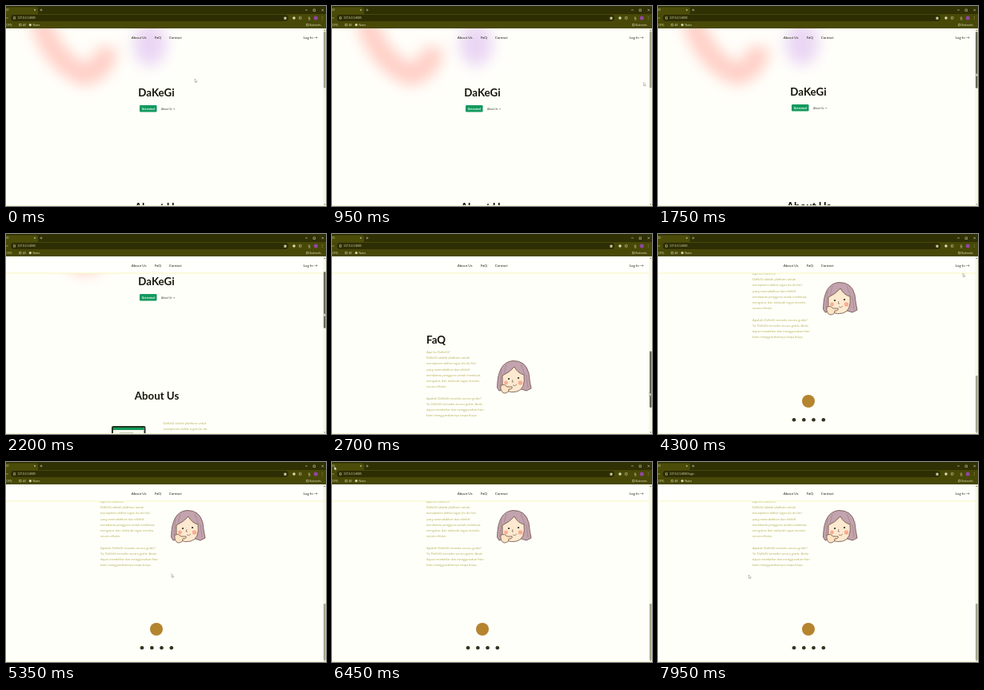
An HTML page for the animation above (8 s loop, 400 by 250 pixels).

```html
<!DOCTYPE html>
<html lang="id">
<head>
<meta charset="utf-8">
<title>DaKeGi</title>
<style>
html, body { margin: 0; height: 100%; overflow: hidden; background: #fffffa; }
svg { display: block; width: 100vw; height: 100vh; font-family: Lato, sans-serif; }
.nav { font-size: 4.6px; fill: #26260f; }
.title { font-size: 13.3px; font-weight: 700; fill: #15150a; text-anchor: middle; }
.copy { font-size: 4.1px; fill: #b9b563; }
.ui { font-size: 3.3px; fill: #d8d8ae; }
.line { fill: none; stroke: #d0d0a4; stroke-width: .6; }
</style>
</head>
<body>
<svg viewBox="0 0 400 250">
  <defs>
    <filter id="blur" x="-50%" y="-50%" width="200%" height="200%"><feGaussianBlur stdDeviation="9"/></filter>
    <clipPath id="view"><rect y="28" width="400" height="222"/></clipPath>
  </defs>
  <rect width="400" height="250" fill="#fffffa"/>

  <g clip-path="url(#view)">
    <g id="page">
      <g filter="url(#blur)">
        <path d="M42 16Q58 70 98 86Q124 80 126 52" fill="none" stroke="#ffab9f" stroke-width="27" opacity=".58"/>
        <ellipse cx="180" cy="48" rx="21" ry="27" fill="#d9b5f0" opacity=".55"/>
      </g>
      <text class="title" x="188" y="113">DaKeGi</text>
      <rect x="167" y="124" width="21.5" height="8.6" rx="1.3" fill="#129a5e"/>
      <text x="177.7" y="129.5" font-size="3.2" font-weight="700" fill="#fff" text-anchor="middle">Get started</text>
      <text x="194" y="129.5" font-size="3.2" fill="#43432a">About Us →</text>

      <text class="title" x="188.5" y="255.5">About Us</text>
      <g id="tablet">
        <rect x="132" y="289" width="42.5" height="34" rx="2" fill="#24351f"/>
        <rect x="134" y="291" width="38.5" height="29" fill="#f9fbef"/>
        <rect x="134" y="291" width="38.5" height="3" fill="#129a5e"/>
        <path d="M142 298h17M142 304h24M142 310h20" stroke="#7f9b75"/>
      </g>
      <g id="about" class="copy"></g>

      <text class="title" x="118" y="504.5" style="text-anchor:start">FaQ</text>
      <g id="faq" class="copy"></g>
      <g transform="translate(0 466)" stroke="#6a5040" stroke-width=".8" stroke-linejoin="round">
        <path d="M209 98L206.500 94Q207 62 226 60.500Q242 60 246 76Q247 86 249 95L243 98L237 96L214 97Z" fill="#c2a3ae"/>
        <path d="M213 79Q222 75 228 68Q232 76 240 78Q242 96 231 99Q217 102 213 91Z" fill="#fde9cf"/>
        <path d="M211 91Q216 89 219 93L225 93Q226 96 221 96Q221 101 215 101Q210 99 211 91Z" fill="#fde4c4"/>
        <path d="M212 70L210 92M218 65L215 76M236 65L241 78M243 78L245 94" fill="none" stroke="#94747f" stroke-width=".5"/>
        <path d="M226 84L225 87L227 87M226 91Q229 93 231 90" fill="none" stroke-width=".6"/>
        <g stroke="none">
          <circle cx="221" cy="83" r="1.100" fill="#33241c"/><circle cx="233" cy="82" r="1.100" fill="#33241c"/>
          <circle cx="217.500" cy="88" r="2.400" fill="#f6ad91"/><circle cx="235.500" cy="88" r="2.700" fill="#f6ad91"/>
        </g>
      </g>

      <circle cx="188" cy="675" r="8" fill="#b5842f"/>
      <g fill="#33331c">
        <circle cx="170" cy="698.300" r="2.300"/><circle cx="182.300" cy="698.300" r="2.300"/>
        <circle cx="194.500" cy="698.300" r="2.300"/><circle cx="206.800" cy="698.300" r="2.300"/>
      </g>
    </g>

    <g id="bar">
      <rect y="28" width="397" height="21" fill="#fffffc"/>
      <rect y="48.500" width="397" height="1" fill="#f8f6be"/>
    </g>
    <g class="nav">
      <text x="156.700" y="40.500">About Us</text>
      <text x="185.800" y="40.500">FaQ</text>
      <text x="203.700" y="40.500">Contact</text>
      <text x="371.700" y="40.500">Log In →</text>
    </g>
    <rect y="249" width="400" height="1" fill="#f5f4cf"/>
    <rect x="396.500" y="28" width="3.500" height="222" fill="#f6f6e2"/>
    <path d="M397.200 31L398.300 29.500L399.400 31ZM397.200 247.500L398.300 249L399.400 247.500Z" fill="#77775a"/>
    <rect id="thumb" x="397" y="32" width="2.600" height="70.500" rx="1"/>
  </g>

  <g>
    <rect width="400" height="28" fill="#484907"/>
    <rect width="400" height="10" fill="#2f3003"/>
    <path d="M0 1.500H38Q40 1.500 40 4V10H0Z" fill="#4b4c08"/>
    <rect x="6" y="11" width="347" height="8" rx="4" fill="#2d2e04"/>
    <g class="ui">
      <text x="0" y="6.300">GI</text>
      <text id="url" x="14.500" y="16.300"></text>
      <text x="0" y="24.800">(195)</text>
      <text x="21" y="24.800">All</text>
      <text x="33.500" y="24.800">Notes</text>
      <text x="379.500" y="24.800" font-size="2.900">Bookmarks</text>
    </g>
    <path class="line" d="M35 4l2 2m0-2l-2 2M42.500 5h3m-1.500-1.500v3M374 5h3M384 4h2.500v2.500h-2.500ZM394.500 3.800l2.500 2.500m0-2.500l-2.500 2.500M0 15h2.500M9.500 13.700h2v2.500h-2ZM16.500 22.500h2.500v2.200h-2.500ZM375.500 22.500h2.500v2.200h-2.500ZM366.500 13.700h2.500v2.500h-2.500ZM379 13v3m-1.300-1.200l1.300 1.300l1.300-1.300M378 17h2.600M395.300 13v.6m0 1v.6m0 1v.6"/>
    <path d="M349 12.700l.7 1.600l1.700.2l-1.300 1.100l.4 1.700l-1.500-.9l-1.500.9l.4-1.700l-1.300-1.100l1.700-.2Z" fill="#d8d8ae"/>
    <circle cx="360" cy="15" r="1.700" fill="#dedeb8"/>
    <circle cx="387.300" cy="15" r="2.500" fill="#9147a4"/>
    <circle cx="30.300" cy="23.600" r="1.600" fill="#d5d5ad"/>
  </g>
  <path id="cursor" d="M0 0V4.300L1 3.500L1.700 5L2.300 4.700L1.700 3.300H3Z" fill="#fff" stroke="#75755c" stroke-width=".4"/>
</svg>
<script>
const LOOP = 8000, STEP = 50, MAX_SCROLL = 466, THUMB_TRAVEL = 145;
const $ = id => document.getElementById(id);

function paragraph(id, x, y, lines) {
  lines.forEach((line, i) => {
    const text = document.createElementNS("http://www.w3.org/2000/svg", "text");
    text.setAttribute("x", x);
    text.setAttribute("y", y + i * 7.2);
    text.textContent = line;
    $(id).append(text);
  });
}

paragraph("about", 196.5, 287, [
  "DaKeGi adalah platform untuk",
  "manajemen daftar tugas (to do",
  "list) yang membantu pengguna",
  "untuk membuat, mengatur, dan",
  "melacak tugas mereka."
]);
paragraph("faq", 118, 517, [
  "Apa itu DaKeGi?",
  "DaKeGi adalah platform untuk",
  "manajemen daftar tugas (to do list)",
  "yang memudahkan dan efektif",
  "membantu pengguna untuk membuat,",
  "mengatur, dan melacak tugas mereka",
  "secara efisien.",
  "",
  "Apakah DaKeGi tersedia secara gratis?",
  "Ya, DaKeGi tersedia secara gratis. Anda",
  "dapat mendaftar dan menggunakan fitur",
  "kami menggunakannya tanpa biaya."
]);

// [time, value...]
const scrollKeys = [[0, 0], [1700, 0], [1750, 1], [2000, 18], [2200, 49], [2350, 175],
  [2500, 340], [2600, 368], [2700, 368], [3050, 430], [3400, 466]];
const cursorKeys = [[0, 236, 91], [450, 320, 116], [850, 389, 96], [1600, 397.5, 83],
  [1750, 397.5, 83.5], [3400, 396, 228], [3500, 387, 239], [3750, 387, 240],
  [4300, 381, 49], [4600, 381, 38], [4700, 381, 38], [5450, 198, 145], [5750, 198, 145],
  [6400, 3, 5], [6700, 2, 13], [7000, 18, 13], [7450, 134, 108], [7950, 113.5, 141]];

function sample(keys, t, ease = u => u) {
  const next = keys.findIndex(k => k[0] > t);
  if (next < 0) return keys.at(-1).slice(1);
  const a = keys[next - 1], b = keys[next];
  const u = ease((t - a[0]) / (b[0] - a[0]));
  return a.slice(1).map((v, i) => v + (b[i + 1] - v) * u);
}

const smooth = u => u * u * (3 - 2 * u);

function draw(now) {
  const t = Math.floor(now % LOOP / STEP) * STEP;
  const [scroll] = sample(scrollKeys, t);
  const shift = scroll / MAX_SCROLL * THUMB_TRAVEL;
  const dragging = t >= 1600 && t < 3450;
  let [x, y] = sample(cursorKeys, t, smooth);
  if (t >= 1750 && t < 3400) y = 83.5 + shift;

  $("page").setAttribute("transform", `translate(0 ${-scroll})`);
  $("bar").setAttribute("visibility", scroll > 5 ? "visible" : "hidden");
  $("thumb").setAttribute("y", 32 + shift);
  $("thumb").setAttribute("fill", dragging ? "#686850" : "#a5a588");
  $("cursor").setAttribute("transform", `translate(${x} ${y})`);
  $("url").textContent = "127.0.0.1:8000" + (t >= 7000 ? "/login" : "");
  requestAnimationFrame(draw);
}
requestAnimationFrame(draw);
</script>
</body>
</html>
```
